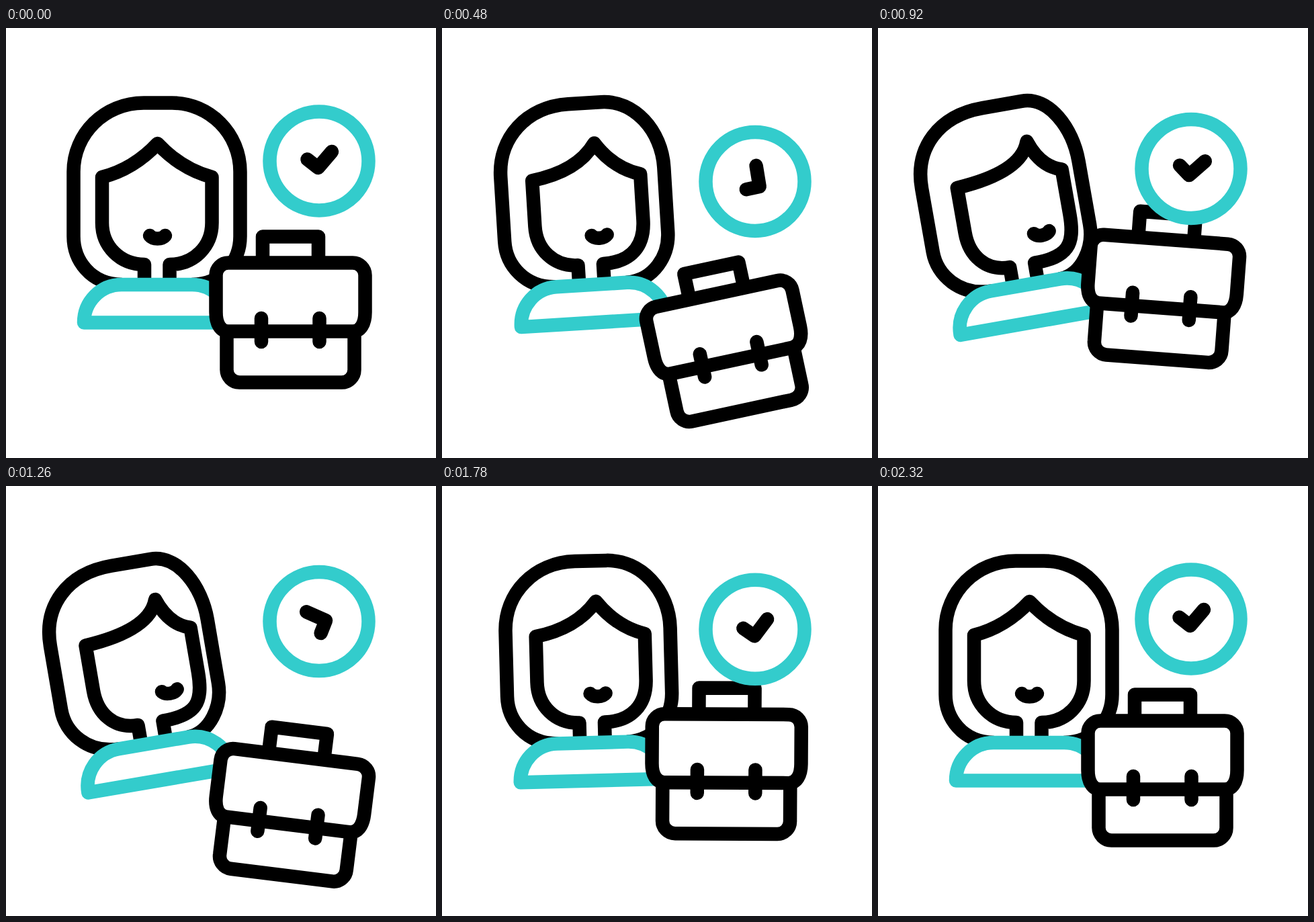
Write an HTML page that moves like this. It is 640 px wide and 640 px high and loops after 2.4 s.

```html
<!DOCTYPE html>
<html lang="en">
<head>
<meta charset="utf-8">
<title>Work time</title>
<style>
  html, body { margin: 0; height: 100%; overflow: hidden; background: #fff; }
  svg { display: block; width: 100vw; height: 100vh; }
  path, circle { fill: #fff; stroke: #000; stroke-width: 20.5; stroke-linecap: round; stroke-linejoin: round; }
  .teal { stroke: #33cccc; }
  .line { fill: none; }
</style>
</head>
<body>
<svg viewBox="0 0 640 640">
  <g id="woman">
    <path id="hair" class="line"/>
    <path id="face" class="line"/>
    <path id="mouth" class="line" d="M214 309C219 315 232 315 237 309"/>
    <path class="teal" d="M116 438.5C116 407 141 382 172 382H277C308 382 333 407 333 438.5Z"/>
  </g>
  <g id="briefcase">
    <path d="M382 349V310.5H465V349"/>
    <path d="M328.5 451V508a19 19 0 0 0 19 19.5H499a19 19 0 0 0 19.5 -19.5V451"/>
    <path d="M331 349.5H516a18.5 18.5 0 0 1 18.5 18.5V423C534.5 440 528 451.5 516 451.5H331C319 451.5 312.5 440 312.5 423V368a18.5 18.5 0 0 1 18.5 -18.5Z"/>
    <path class="line" d="M380 432V467M466.5 432V467"/>
  </g>
  <g id="clock">
    <circle class="teal" cx="466" cy="198" r="73.5"/>
    <path id="hands" class="line" d="M448.5 195.5L464.5 208L485 184"/>
  </g>
</svg>
<script>
const LOOP = 2400;
const $ = id => document.getElementById(id);

const easeInOut = (x, power) => {
  x = Math.min(1, Math.max(0, x));
  return x < 0.5 ? (2 * x) ** power / 2 : 1 - (2 - 2 * x) ** power / 2;
};

// Sine-eased value through [time, value] keys.
function track(t, keys) {
  const i = keys.findIndex(key => key[0] > t);
  if (i < 0) return keys[keys.length - 1][1];
  const [t0, v0] = keys[i - 1], [t1, v1] = keys[i];
  return v0 + (v1 - v0) * (1 - Math.cos(Math.PI * (t - t0) / (t1 - t0))) / 2;
}

// One full turn with a quick start and a long settle.
const spin = (t, width) => t > 0 ? 360 * (1 - Math.exp(-((t / width) ** 1.52))) : 0;

const caseDrop = [[0, 0], [220, -20], [575, 57], [920, -35], [1265, 52.5], [1660, -20], [2020, 20], [2320, 0]];
const caseTilt = [[0, 0], [655, -14.5], [1110, 15.3], [1480, -7.7], [1780, 0.3], [2160, 0]];
const clockDrop = [[0, 0], [410, 43], [680, -35], [1065, 32], [1435, -20], [1800, 15.5], [2150, 0]];

function drawWoman(t) {
  const tilt = 10 * (easeInOut(t / 1050, 4) - easeInOut((t - 1050) / 1100, 3));
  const turn = easeInOut(t / 1080, 2) - easeInOut((t - 1080) / 1080, 2);
  const at = (rest, shift) => rest + shift * turn;

  const hairL = at(100.5, -3.5), hairR = at(348.5, -15);
  $('hair').setAttribute('d',
    `M172 382C125 381 ${hairL} 345 ${hairL} 310V214` +
    `C${hairL} ${at(157, -4)} ${at(147, -7)} 111.5 ${at(205, 2)} 111.5H${at(247, 20)}` +
    `C${at(303, 5)} 111.5 ${hairR} ${at(157, 8)} ${hairR} 214V310` +
    `C${hairR} 345 ${at(324, -15)} 381 277 382`);

  const faceL = at(143, 6.5), faceR = at(306.5, 1);
  $('face').setAttribute('d',
    `M206 382V352C170 352 ${faceL} 325 ${faceL} 290V222` +
    `Q${at(190, 61)} ${at(210, 6)} ${at(225.5, 39.5)} 172` +
    `Q${at(261, 16.5)} ${at(210, 3)} ${faceR} 222V290` +
    `C${faceR} ${at(325, 12)} ${at(280, 14)} 352 243.5 352V382`);

  $('mouth').setAttribute('transform', `translate(${37.5 * turn} 0)`);
  $('woman').setAttribute('transform', `rotate(${-tilt} 224.5 410)`);
}

function draw(t) {
  drawWoman(t);
  $('briefcase').setAttribute('transform',
    `translate(0 ${track(t, caseDrop)}) rotate(${track(t, caseTilt)} 423.5 418.5)`);
  $('clock').setAttribute('transform', `translate(0 ${track(t, clockDrop)})`);
  $('hands').setAttribute('transform', `rotate(${spin(t, 307) + spin(t - 890, 326)} 466 198)`);
}

function frame() {
  draw(performance.now() % LOOP);
  requestAnimationFrame(frame);
}
frame();
</script>
</body>
</html>
```
